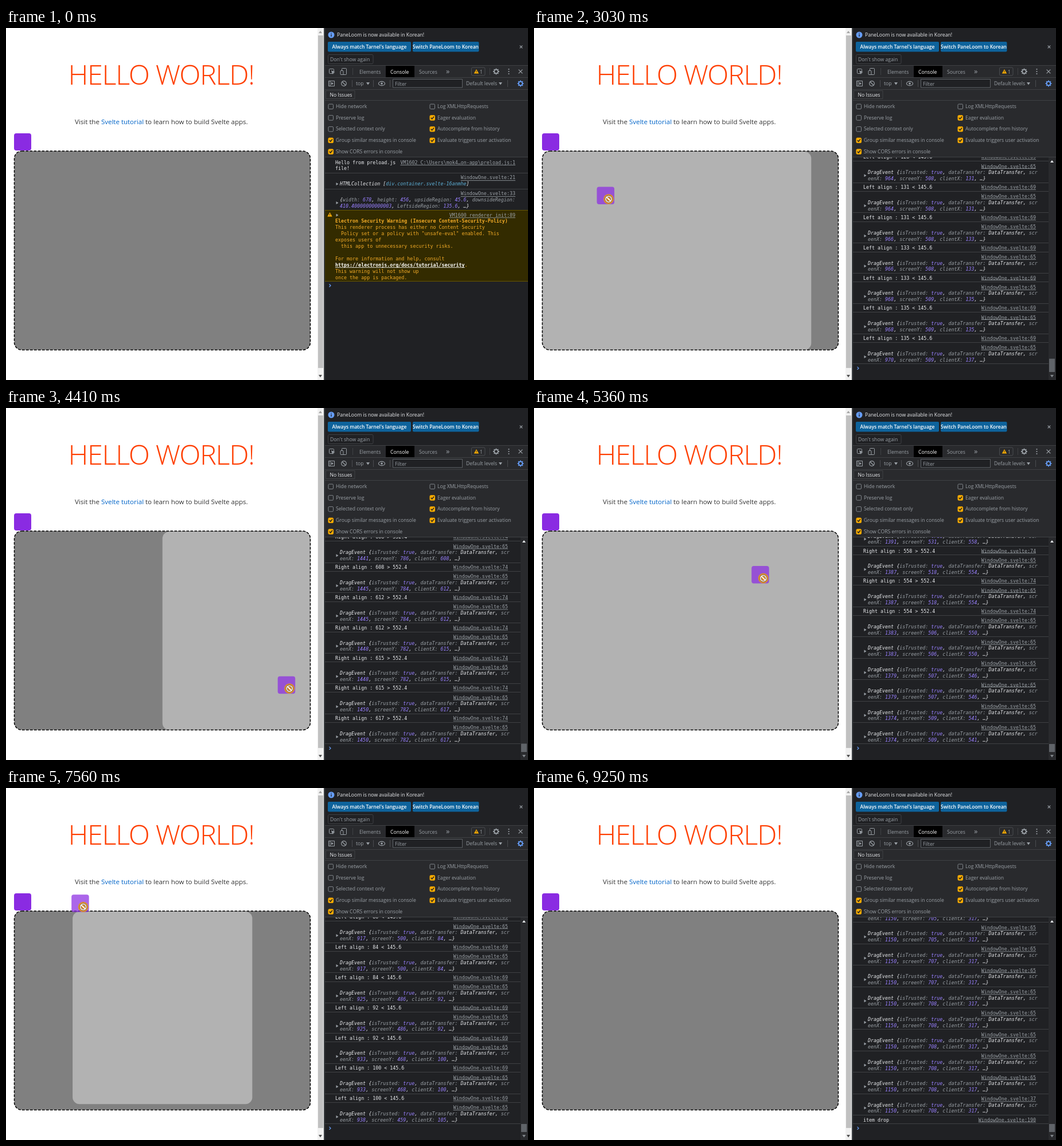
Animation of 910 by 615 pixels, one loop 9920 ms. Source, as an HTML page with a canvas:

```html
<!DOCTYPE html>
<html lang="en">
<head>
<meta charset="utf-8">
<style>
  html, body { margin: 0; height: 100%; overflow: hidden; background: #fff; }
  canvas { display: block; }
</style>
</head>
<body>
<canvas id="stage" width="910" height="615"></canvas>
<script>
const ctx = document.getElementById('stage').getContext('2d');
const LOOP = 9920, FRAME = 68.78, TICKS_PER_FRAME = 2.075, LOG_LAG = 5, DROP = 259.2;
const SANS = '"Open Sans", "Noto Sans", sans-serif', MONO = '"DejaVu Sans Mono", monospace';
const WHITE = '#e8eaed', GREY = '#9aa0a6', PURPLE = '#9980ff', AMBER = '#f2ab26', LINE = '#3f4144';

// Pointer path while dragging: tick, clientX, clientY
const path = [
  [25, 44, 268], [46, 204, 305.6], [49, 207, 306.5], [55, 207, 307], [70, 225, 420],
  [78, 112, 380], [84, 131, 382], [87, 137, 383.4], [92.15, 164, 392],
  [108, 360, 620], [113, 400, 705], [125, 608, 660], [126, 612, 658], [127, 615, 656],
  [128, 617, 656], [133.65, 640, 642], [155, 550, 380],
  [190, 398, 426], [191, 400, 408], [192, 409, 376], [193, 412, 365], [195, 416, 354],
  [200.05, 423, 321.6], [205, 410, 283], [218, 72, 390],
  [221, 84, 374], [222, 92, 360], [223, 100, 342], [224, 105, 333],
  [227.7, 142, 326], [228.5, 155, 321], [229.1, 170, 273], [233, 215, 236],
  [246, 215, 236], [250, 260, 340], [255, 317, 579], [257, 317, 582]
];
const sides = [
  { name: 'Left', line: 69, hit: (x, y) => x < 145.6, test: x => `${x} < 145.6`, w: .5, h: 1, ax: 0 },
  { name: 'Right', line: 74, hit: (x, y) => x > 552.4, test: x => `${x} > 552.4`, w: .5, h: 1, ax: 1 },
  { name: 'Top', line: 79, hit: (x, y) => y < 319.6, test: (x, y) => `${y} < 319.6`, w: 1, h: .5, ax: .5, ay: 0 },
  { name: 'Bottom', line: 84, hit: (x, y) => y > 684.4, test: (x, y) => `${y} > 684.4`, w: 1, h: .5, ax: .5, ay: 1 }
];
const full = { w: 1, h: 1 };

function pointer(tick) {
  if (tick <= path[0][0]) return path[0].slice(1);
  const i = path.findIndex(k => k[0] > tick);
  if (i < 0) return path[path.length - 1].slice(1);
  const [a, b] = [path[i - 1], path[i]], f = (tick - a[0]) / (b[0] - a[0]);
  return [1, 2].map(j => a[j] + (b[j] - a[j]) * f);
}
const inside = y => y > 270;
const sideAt = (x, y) => sides.find(s => s.hit(x, y));

// CSS "ease" curve, solved by bisection
function ease(x) {
  if (x >= 1) return 1;
  const bez = (s, a, b) => 3 * s * (1 - s) ** 2 * a + 3 * s * s * (1 - s) * b + s ** 3;
  let lo = 0, hi = 1;
  for (let i = 0; i < 20; i++) {
    const m = (lo + hi) / 2;
    if (bez(m, .25, .25) < x) lo = m; else hi = m;
  }
  return bez(lo, .1, 1);
}
const tween = (t, tick) => t.from + (t.to - t.from) * ease((tick - t.start) / 6.7);
const retarget = (t, to, tick) => t.to === to ? t : { from: tween(t, tick), to, start: tick };

// Highlight changes and console rows, worked out once from the path
const zones = [], rows = [];
const still = { from: 1, to: 1, start: 0 };
let zone = { tick: 0, mode: null, w: still, h: still, ax: 0, ay: 0 };
for (let n = 250; n < 2650; n++) {
  const tick = n / 10, [x, y] = pointer(tick);
  const mode = inside(y) ? sideAt(x, y) || full : null;
  if (mode === zone.mode) continue;
  zone = { ...zone, tick, mode };
  if (mode) {
    zone.w = retarget(zone.w, mode.w, tick);
    zone.h = retarget(zone.h, mode.h, tick);
    zone.ax = mode.ax ?? zone.ax;
    zone.ay = mode.ay ?? zone.ay;
  }
  zones.push(zone);
}
for (let tick = 25; tick <= 259; tick += .5) {
  const [x, y] = pointer(Math.floor(tick)).map(Math.round);
  if (!inside(y)) continue;
  rows.push({ tick, x, y, link: 65 });
  const side = sideAt(x, y);
  if (side) rows.push({ tick: tick + .25, note: `${side.name} align : ${side.test(x, y)}`, link: side.line });
}
rows.push({ tick: DROP, x: 317, y: 582, link: 37 }, { tick: DROP, note: 'item drop', link: 190 });

function text(str, x, y, color, size = 8.67, { style = '', family = SANS, align = 'left', under } = {}) {
  ctx.font = `${style} ${size}px ${family}`;
  ctx.textAlign = align;
  ctx.fillStyle = color;
  ctx.fillText(str, x, y + size * .35);
  const w = ctx.measureText(str).width;
  if (under) ctx.fillRect(align === 'right' ? x - w : x, Math.round(y + 4), w, .8);
  return x + w;
}
const mono = (str, x, y, color = WHITE, opts) => text(str, x, y, color, 8.33, { family: MONO, ...opts });
const link = (str, x, y) => mono(str, x, y, GREY, { align: 'right', under: true });
function italics(x, y, ...parts) {
  for (let i = 0; i < parts.length; i += 2) x = mono(parts[i], x, y, parts[i + 1], { style: 'italic' });
}
function rect(x, y, w, h, color) { ctx.fillStyle = color; ctx.fillRect(x, y, w, h); }
function box(x, y, w, h, r, fill, stroke, lw = 1) {
  ctx.beginPath();
  ctx.roundRect(x, y, w, h, r);
  if (fill) { ctx.fillStyle = fill; ctx.fill(); }
  if (stroke) { ctx.strokeStyle = stroke; ctx.lineWidth = lw; ctx.stroke(); }
}
function disc(x, y, r, fill, stroke, lw = 1) { box(x - r, y - r, 2 * r, 2 * r, r, fill, stroke, lw); }
function line(color, lw, ...p) {
  ctx.beginPath();
  for (let i = 0; i < p.length; i += 2) ctx.lineTo(p[i], p[i + 1]);
  ctx.strokeStyle = color; ctx.lineWidth = lw; ctx.stroke();
}
function poly(color, ...p) {
  ctx.beginPath();
  for (let i = 0; i < p.length; i += 2) ctx.lineTo(p[i], p[i + 1]);
  ctx.fillStyle = color; ctx.fill();
}
const down = (x, y, c) => poly(c, x - 3, y - 2, x + 3, y - 2, x, y + 2.5);
const up = (x, y, c) => poly(c, x - 3, y + 2, x + 3, y + 2, x, y - 2);
const expander = (y, c = GREY) => poly(c, 575.5, y - 2.5, 575.5, y + 2.5, 579.5, y);
const cross = (x, y, r, c) => { line(c, 1.2, x - r, y - r, x + r, y + r); line(c, 1.2, x - r, y + r, x + r, y - r); };
const warnSign = (x, y) => { poly('#f9ab00', x, y - 4, x + 4.2, y + 3.5, x - 4.2, y + 3.5); rect(x - .5, y - 1.5, 1, 3, '#333'); };
function gear(x, y, c) {
  disc(x, y, 3.3, null, c, 1.7);
  for (let a = 0; a < 8; a++) {
    const u = Math.cos(a * Math.PI / 4), v = Math.sin(a * Math.PI / 4);
    line(c, 1.8, x + 3.5 * u, y + 3.5 * v, x + 5.4 * u, y + 5.4 * v);
  }
}
function check(x, y, on, label) {
  box(x + .5, y - 4, 8.5, 8.5, 1.5, on ? '#f9ab00' : '#292a2d', on ? '#f9ab00' : '#80858a');
  if (on) line('#202124', 1.5, x + 2.3, y, x + 4.2, y + 2.2, x + 7.6, y - 2);
  text(label, x + 13.5, y, GREY);
}

function drawPage(tick) {
  rect(0, 0, 543, 615, '#fff');
  ctx.letterSpacing = '-1.3px';
  text('HELLO WORLD!', 270.5, 82.5, '#ff3e00', 48.5, { style: '300', align: 'center' });
  ctx.letterSpacing = '0px';
  let x = text('Visit the ', 120, 164, '#333', 11.54);
  x = text('Svelte tutorial', x, 164, '#0064c8', 11.54);
  text(' to learn how to build Svelte apps.', x, 164, '#333', 11.54);

  box(14.5, 215, 516, 347.5, 13, '#808080');
  const z = zones.filter(z => z.tick <= tick).pop();
  if (z && z.mode && tick < DROP + LOG_LAG) {
    const w = 515.5 * tween(z.w, tick), h = 346.5 * tween(z.h, tick);
    box(15 + (515.5 - w) * z.ax, 216 + (346.5 - h) * z.ay, w, h, 12, '#b2b2b2');
  }
  ctx.setLineDash([4.6, 2.4]);
  box(14.5, 215, 516, 347.5, 13, null, '#000', 1.5);
  ctx.setLineDash([]);
  box(14, 184, 30, 30, 4, '#8a2be2');

  rect(543, 0, 11, 615, '#f1f1f1');
  rect(544, 13, 9, 581, '#c1c1c1');
  up(548, 7, '#a3a3a3');
  down(548, 608, '#505050');
}

function drawToolbars() {
  rect(554, 0, 2, 615, '#3c4043');
  rect(556, 0, 354, 66, '#202124');
  rect(556, 66, 354, 160, '#292a2d');
  for (const y of [65, 86, 107, 126, 225]) rect(556, y, 354, 1, LINE);

  disc(567, 12, 5.5, '#669df6');
  rect(566.4, 11, 1.3, 4, '#202124'); rect(566.4, 8.6, 1.3, 1.3, '#202124');
  text('PaneLoom is now available in Korean!', 577, 12, WHITE);
  const bold = { style: '600', align: 'center' };
  box(561, 24, 145, 17.5, 2, '#0e639c');
  text("Always match Tarnel's language", 633.5, 33, '#fff', 8.5, bold);
  box(709, 24, 115.5, 17.5, 2, '#0e639c');
  text('Switch PaneLoom to Korean', 766.5, 33, '#fff', 8.5, bold);
  box(561.5, 46.5, 78.5, 16, 2, '#202124', LINE);
  text("Don't show again", 565, 55, GREY);
  cross(898, 33, 2.3, GREY);

  box(563.5, 71.5, 8, 8, 1, null, GREY);
  poly(GREY, 567, 74, 573.5, 77, 570.5, 78, 569.2, 81);
  box(585.5, 70.5, 8, 11, 1, null, GREY);
  box(583, 74.5, 5, 7, 1, '#292a2d', GREY);
  rect(604, 70, 1, 12, LINE);
  text('Elements', 616, 76.5, GREY);
  rect(662, 66, 50, 20, '#000');
  text('Console', 670, 76.5, '#fff');
  text('Sources', 720, 76.5, GREY);
  text('»', 767, 75.5, GREY, 13);
  box(811.5, 69, 23.5, 14, 2, null, '#4a4c50');
  warnSign(820, 76);
  text('1', 826, 76.5, GREY);
  rect(843, 70, 1, 12, LINE);
  gear(854.5, 76, GREY);
  for (const y of [72, 76, 80]) disc(876.5, y, 1.1, GREY);
  cross(897, 76, 3.4, GREY);

  box(562.5, 92.5, 10, 9, 0, null, GREY);
  rect(564.5, 93, 1, 8, GREY);
  poly(GREY, 567, 94.5, 571, 97, 567, 99.5);
  disc(589, 97, 4.3, null, GREY, 1.2);
  line(GREY, 1.2, 586, 94, 592, 100);
  for (const x of [603, 640, 669, 874]) rect(x, 91, 1, 12, '#4a4c50');
  text('top', 610, 97, GREY);
  down(631, 97, GREY);
  ctx.beginPath();
  ctx.ellipse(655, 97, 5.5, 3.6, 0, 0, 7);
  ctx.strokeStyle = GREY; ctx.lineWidth = 1.2; ctx.stroke();
  disc(655, 97, 1.8, GREY);
  box(674.5, 89.5, 121, 14.5, 0, '#202124', '#5f6368');
  text('Filter', 678, 97.5, GREY);
  text('Default levels', 802, 97, GREY);
  down(862, 97, GREY);
  gear(897, 97, '#669df6');
  box(557.5, 109.5, 50.5, 14, 0, null, LINE);
  text('No Issues', 564.5, 117, WHITE);

  ['Hide network', 'Preserve log', 'Selected context only', 'Group similar messages in console', 'Show CORS errors in console']
    .forEach((s, i) => check(561.5, 137 + 19.7 * i, i > 2, s));
  ['Log XMLHttpRequests', 'Eager evaluation', 'Autocomplete from history', 'Evaluate triggers user activation']
    .forEach((s, i) => check(738.5, 137 + 19.7 * i, i > 0, s));
}

function drawFirstLogs(right) {
  mono('Hello from preload.js', 574, 235);
  mono('file!', 574, 245.5);
  link('VM1602 C:\\Users\\mok4…on-app\\preload.js:1', right, 235);
  link('WindowOne.svelte:21', right, 261.5);
  expander(272.5);
  italics(582, 272.5, 'HTMLCollection [', WHITE, 'div.container.svelte-16anmhe', '#5db0d7', ']', WHITE);
  link('WindowOne.svelte:33', right, 289.5);
  expander(305.5);
  italics(582, 300.5, '{', WHITE, 'width: ', GREY, '678', PURPLE, ', ', WHITE, 'height: ', GREY, '456', PURPLE, ', ', WHITE,
    'upsideRegion: ', GREY, '45.6', PURPLE, ', ', WHITE, 'downsideRegion:', GREY);
  italics(582, 311, '410.40000000000003', PURPLE, ', ', WHITE, 'LeftsideRegion: ', GREY, '135.6', PURPLE, ', …}', WHITE);
  for (const y of [253, 281]) rect(556, y, 354, 1, LINE);
  rect(556, 318.5, 354, 124.5, '#332b00');
  for (const y of [318, 442]) rect(556, y, 354, 1, '#665500');
  warnSign(564.5, 326);
  expander(327);
  link('VM1600 renderer init:89', right, 327);
  ['Electron Security Warning (Insecure Content-Security-Policy)',
    'This renderer process has either no Content Security',
    '  Policy set or a policy with "unsafe-eval" enabled. This', 'exposes users of',
    '  this app to unnecessary security risks.', '', 'For more information and help, consult', '',
    'This warning will not show up', 'once the app is packaged.'
  ].forEach((s, i) => mono(s, 574, 337.5 + 10.9 * i, AMBER, { style: i ? '' : 'bold' }));
  const end = mono('https://electronjs.org/docs/tutorial/security', 574, 413.8, '#fff', { style: 'bold', under: true });
  mono('.', end, 413.8, AMBER);
}

function drawRow(row, y, right) {
  if (row.note) {
    mono(row.note, 574, y + 7.6);
    link('WindowOne.svelte:' + row.link, right, y + 7.6);
  } else {
    link('WindowOne.svelte:' + row.link, right, y + 8.5);
    expander(y + 24.5);
    italics(582, y + 19, 'DragEvent {', WHITE, 'isTrusted: ', GREY, 'true', PURPLE, ', ', WHITE, 'dataTransfer: ', GREY,
      'DataTransfer, ', WHITE, 'scr', GREY);
    italics(582, y + 29.8, 'eenX: ', GREY, row.x + 833, PURPLE, ', ', WHITE, 'screenY: ', GREY, row.y + 126, PURPLE, ', ', WHITE,
      'clientX: ', GREY, row.x, PURPLE, ', …}', WHITE);
  }
}

function drawConsole(tick) {
  rect(556, 226, 354, 389, '#202124');
  const shown = rows.filter(r => r.tick <= tick), height = r => r.note ? 15.4 : 37.4;
  const total = shown.reduce((y, r) => y + height(r), 443), scroll = Math.max(0, total - 587.4);
  const right = scroll ? 875 : 888;
  ctx.save();
  ctx.beginPath();
  ctx.rect(556, 226, 354, 389);
  ctx.clip();
  ctx.translate(0, -scroll);
  if (scroll < 217) drawFirstLogs(right);
  let y = 443;
  for (const row of shown) {
    const h = height(row);
    if (y + h > scroll + 226) {
      drawRow(row, y, right);
      rect(556, Math.round(y + h - scroll - 1) + scroll, 354, 1, LINE);
    }
    y += h;
  }
  line('#669df6', 1.3, 563.5, total + 4.5, 566, total + 7, 563.5, total + 9.5);
  ctx.restore();
  if (scroll) {
    rect(897, 226, 13, 389, '#292a2d');
    const thumb = Math.max(14, 360 * 389 / (total - 199));
    rect(898, 601 - thumb, 10, thumb, '#5f6368');
    up(903, 233, WHITE);
    down(903, 608, '#80858a');
  }
}

function drawArrow(x, y) {
  disc(x, y, 10, 'rgba(250, 200, 50, .6)');
  poly('#fff', x, y, x, y + 12, x + 3, y + 9, x + 8.4, y + 8.6);
  ctx.closePath();
  ctx.strokeStyle = '#000'; ctx.lineWidth = .8; ctx.stroke();
}
function drawDrag(tick) {
  const [cx, cy] = pointer(tick), x = cx * .765 + 4.6, y = cy * .765 - 1;
  ctx.globalAlpha = .72;
  box(x - 20.5, y - 21.5, 30.5, 30.5, 4, '#8a2be2');
  ctx.globalAlpha = 1;
  disc(x, y, 9, 'rgba(222, 148, 30, .88)');
  disc(x, y, 5, null, '#5a4a30', 2.6);
  disc(x, y, 5, null, '#fff', 1.5);
  line('#fff', 1.7, x - 3.5, y - 3.5, x + 3.5, y + 3.5);
}
function drawPointer(step, tick) {
  if (step < 0 || step > 131) return;
  if (step < 10) {
    const f = Math.min(1, step / 8);
    drawArrow(250 - 212 * f, 32 + 172 * f);
  } else if (tick < DROP) {
    drawDrag(tick + LOG_LAG);
  } else {
    const f = Math.max(0, step - 129) / 2;
    drawArrow(247 + 498 * f, 444 + 145 * f);
  }
}

function draw(now) {
  const step = Math.floor((now % LOOP - 130) / FRAME + .1), tick = step * TICKS_PER_FRAME;
  ctx.clearRect(0, 0, 910, 615);
  drawPage(tick + LOG_LAG);
  drawConsole(tick);
  drawToolbars();
  drawPointer(step, tick);
  requestAnimationFrame(draw);
}
requestAnimationFrame(draw);
</script>
</body>
</html>
```
